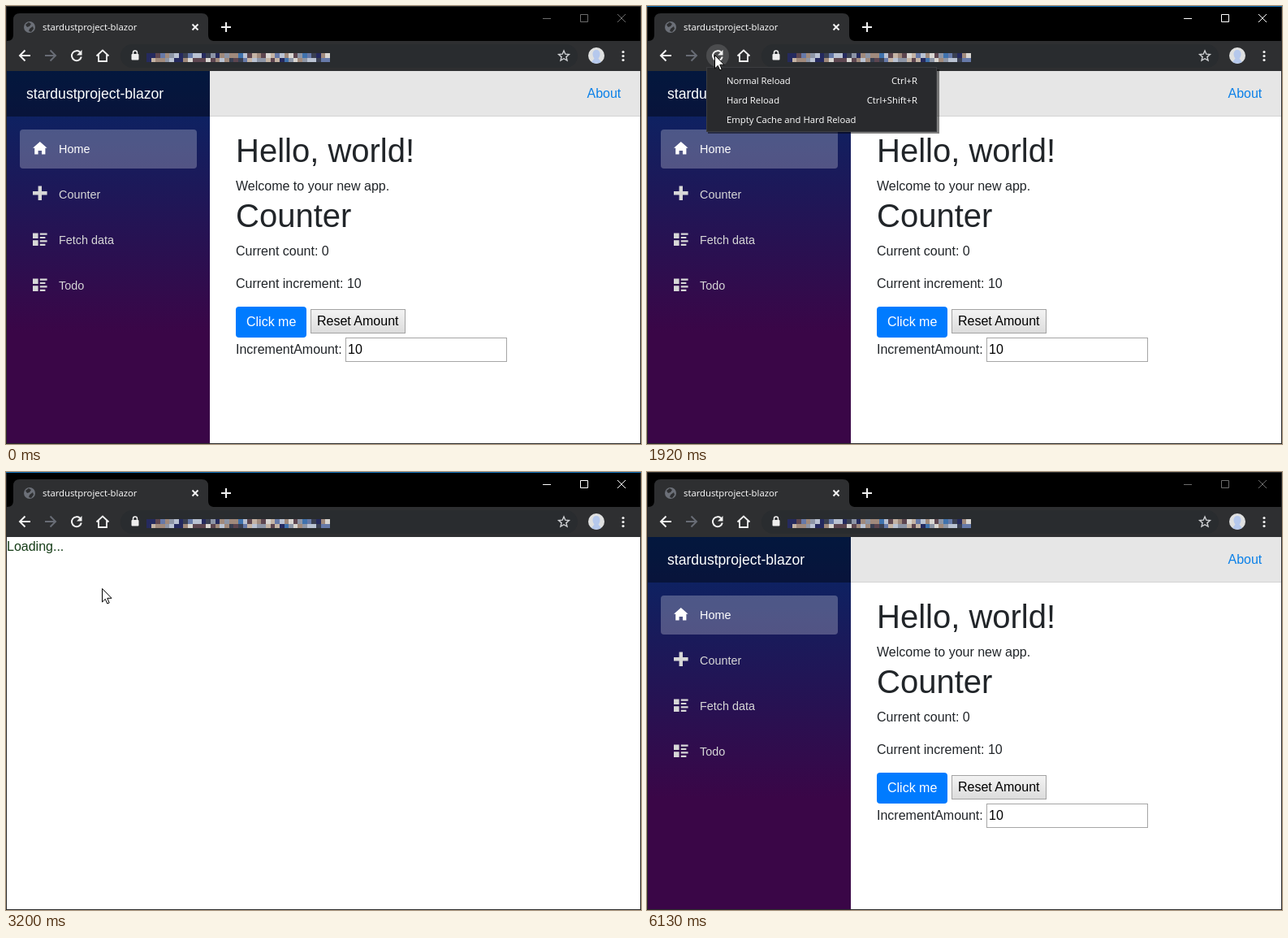
An HTML page for the animation above (6280 ms loop, 782 by 539 pixels).

```html
<!DOCTYPE html>
<html lang="en">
<head>
<meta charset="utf-8">
<title>Blazor app reload</title>
<style>
  html, body { margin: 0; width: 100%; height: 100%; overflow: hidden; background: #000; }
  svg { display: block; width: 782px; height: 539px; }
  text { white-space: pre; }
  .page { font: 16px "Liberation Sans", Arial, sans-serif; fill: #212529; }
  .h1 { font-size: 40px; }
  .brand { font-size: 17.6px; fill: #fff; }
  .nav { font-size: 14.4px; fill: #d7d7d7; }
  .ui { font: 11.3px "Open Sans", "Noto Sans", sans-serif; fill: #fff; }
  .end { text-anchor: end; }
  .line { fill: none; stroke: #f1f1f1; stroke-width: 2; }

  .timed { animation: 6.28s step-end infinite; }
  .focus { animation-name: focus; }
  .blur { animation-name: blur; }
  .hover { animation-name: hover; }
  .menu { animation-name: menu; }
  .row { animation-name: row; }
  .idle { animation-name: idle; }
  .busy { animation-name: busy; }
  .app { animation-name: app; }
  .icons { animation-name: icons; }
  .loading { animation-name: loading; }
  .press { animation-name: press; }
  .cursor { animation-name: cursor; }
  .spin { transform-origin: 29px 26px; animation: spin .7s linear infinite; }

  @keyframes focus { 0%, 97.61% { visibility: hidden } 18.31% { visibility: visible } }
  @keyframes blur { 0%, 97.61% { visibility: visible } 18.31% { visibility: hidden } }
  @keyframes hover { 0%, 50.95% { opacity: 0 } 14.64% { opacity: .4 } 15.85% { opacity: .75 } 17.06% { opacity: 1 } }
  @keyframes menu { 0%, 44.1% { visibility: hidden } 26.91% { visibility: visible } }
  @keyframes row {
    0%, 44.1% { opacity: 0; transform: none }
    32.96% { opacity: 1; transform: translateY(-48px) }
    34.16% { opacity: 1; transform: translateY(-24px) }
    35.35% { opacity: 1; transform: none }
  }
  @keyframes idle { 0%, 50.95% { visibility: visible } 45.54% { visibility: hidden } }
  @keyframes busy { 0%, 50.95% { visibility: hidden } 45.54% { visibility: visible } }
  @keyframes app { 0%, 70.38% { opacity: 1 } 46.81% { opacity: 0 } }
  @keyframes icons { 0%, 71.49% { opacity: 1 } 46.81% { opacity: 0 } }
  @keyframes loading { 0%, 70.38% { visibility: hidden } 48.24% { visibility: visible } }
  @keyframes press { 0%, 30.57%, 44.1% { opacity: 0 } 18.31%, 38.05% { opacity: .88 } }
  @keyframes spin { to { transform: rotate(360deg) } }
  @keyframes cursor {
    0%, 85.19% { transform: translate(800px, 560px) }
    3.66% { transform: translate(650px, 464px) }
    4.88% { transform: translate(521px, 268px) }
    6.09% { transform: translate(400px, 180px) }
    7.31% { transform: translate(300px, 136px) }
    8.52% { transform: translate(222px, 106px) }
    9.73% { transform: translate(162px, 84px) }
    10.95% { transform: translate(116px, 68px) }
    12.16% { transform: translate(91px, 58px) }
    13.37% { transform: translate(80px, 54px) }
    14.64%, 30.57% { transform: translate(83px, 60px) }
    31.77% { transform: translate(87px, 70px) }
    32.96% { transform: translate(95px, 92px) }
    34.16% { transform: translate(106px, 114px) }
    35.35% { transform: translate(114px, 127px) }
    39.33% { transform: translate(117px, 140px) }
    44.1% { transform: translate(118px, 143px) }
    79.29% { transform: translate(150px, 165px) }
    80.48% { transform: translate(260px, 235px) }
    81.66% { transform: translate(420px, 335px) }
    82.83% { transform: translate(580px, 430px) }
    84.01% { transform: translate(710px, 505px) }
  }
</style>
</head>
<body>
<svg viewBox="0 0 782 539">
  <defs>
    <linearGradient id="side" x2="0" y2="1">
      <stop stop-color="#052767"/><stop offset=".7" stop-color="#3a0647"/>
    </linearGradient>
    <linearGradient id="button" x2="0" y2="1">
      <stop stop-color="#f3f3f3"/><stop offset="1" stop-color="#dcdcdc"/>
    </linearGradient>
    <path id="list" d="M0 0v3h3v-3zm4 0v1h4v-1zm0 2v1h3v-1zm-4 2v3h3v-3zm4 0v1h4v-1zm0 2v1h3v-1z"/>
  </defs>

  <!-- window frame and tab -->
  <rect width="782" height="539"/>
  <path d="M1 43C7 43 9 40 9 35V17Q9 9 17 9H241Q249 9 249 17V35C249 40 251 43 257 43H781V80H1Z" fill="#2e2f31"/>
  <rect x="141" y="47" width="563" height="29" rx="14.5" fill="#292c2f"/>
  <g class="timed idle">
    <circle cx="29" cy="26" r="7" fill="#6c7078"/>
    <path d="M24 23l4-3 3 2-2 3-3 1zM29 28l4-3 1 3-3 4-3-1z" fill="#2e2f31"/>
  </g>
  <g class="timed busy">
    <circle cx="29" cy="27" r="4.5" fill="#6c7078"/>
    <path d="M26.5 25l2-1.500 2 1-1 2zM29 28l3-1-1 3z" fill="#2e2f31"/>
    <path class="spin" d="M29 18.500A7.500 7.500 0 0 1 33 19.700" fill="none" stroke="#777b82" stroke-width="1.500"/>
  </g>
  <text class="ui" x="45" y="30">stardustproject-blazor</text>
  <path class="line" stroke-width="1.700" d="M229.500 22.500l7 7m0-7l-7 7"/>
  <path class="line" d="M265 26h12M271 20v12"/>
  <g fill="none" stroke-width="1">
    <path class="timed blur" stroke="#6c6c6c" d="M661 15.500h10M707.500 10.500h9v9h-9zM753 10l10 10m0-10l-10 10"/>
    <path class="timed focus" stroke="#fff" d="M661 15.500h10M707.500 10.500h9v9h-9zM753 10l10 10m0-10l-10 10"/>
  </g>

  <!-- toolbar -->
  <path class="line" d="M30 61H17m6.500-6.500L17 61l6.500 6.500"/>
  <path class="line" style="stroke:#686c75" d="M48 61h13m-6.500-6.500L61 61l-6.500 6.500"/>
  <circle class="timed hover" cx="87" cy="61" r="14" fill="#4b4c4e"/>
  <g class="timed idle">
    <path class="line" d="M91.500 57.200A6 6 0 1 0 92.800 62.500"/>
    <path d="M93.500 54v6.500H87z" fill="#f1f1f1"/>
  </g>
  <path class="line timed busy" style="stroke-width:1.700" d="M81.500 55.500l11 11m0-11l-11 11"/>
  <path class="line" style="stroke-width:1.800" d="M111.500 61.500L119 54.500l7.500 7M114 60v8h10v-8"/>
  <rect x="154.500" y="59" width="9" height="7.500" rx="1" fill="#eee"/>
  <path class="line" style="stroke-width:1.500" d="M156.500 59.500v-2a2.500 2.500 0 0 1 5 0v2"/>
  <g id="address" shape-rendering="crispEdges"></g>
  <path class="line" style="stroke:#d0d2d5;stroke-width:1.400" d="M687 55l1.800 4.200 4.600.4-3.500 3 1.100 4.500-4-2.400-4 2.400 1.100-4.500-3.500-3 4.600-.4z"/>
  <circle cx="727" cy="61" r="10" fill="#dfe0e0"/>
  <path d="M727 54c3 0 4.500 2 4.500 5s-1 4-2 5.500l3.500 4.500q-6 3.500-12 0l3.500-4.500c-1-1.500-2-2.500-2-5.500s1.500-5 4.500-5z" fill="#b5c8ec"/>
  <g fill="#f1f1f1"><circle cx="760" cy="56.500" r="1.600"/><circle cx="760" cy="61.500" r="1.600"/><circle cx="760" cy="66.500" r="1.600"/></g>

  <!-- page -->
  <rect x="1" y="80" width="780" height="458" fill="#fff"/>
  <text class="page timed loading" x="1" y="97" style="fill:#163d18">Loading...</text>
  <g class="page timed app">
    <rect x="1" y="80" width="250" height="459" fill="url(#side)"/>
    <rect x="1" y="80" width="250" height="56" fill-opacity=".4" fill="#000"/>
    <text class="brand" x="25" y="114">stardustproject-blazor</text>
    <rect x="17" y="152" width="218" height="48" rx="4" fill="#fff" fill-opacity=".25"/>
    <text class="nav" x="65" y="181" style="fill:#fff">Home</text>
    <text class="nav" x="65" y="237">Counter</text>
    <text class="nav" x="65" y="293">Fetch data</text>
    <text class="nav" x="65" y="349">Todo</text>
    <g class="timed icons" fill="#d7d7d7">
      <path transform="translate(33 167) scale(2.200)" fill="#fff" d="M4 0l-4 3.500h1v3.500h2v-2h2v2h2v-3.500h1z"/>
      <path transform="translate(33 221.500) scale(2.200)" d="M3 0v3h-3v2h3v3h2v-3h3v-2h-3v-3z"/>
      <use href="#list" transform="translate(33 279.500) scale(2.200)"/>
      <use href="#list" transform="translate(33 335.500) scale(2.200)"/>
      <rect x="30" y="538" width="17" height="1"/>
    </g>
    <rect x="251" y="80" width="530" height="56" fill="#e6e6e6"/>
    <rect x="251" y="135" width="530" height="1" fill="#d3d3d3"/>
    <text x="715.500" y="113" fill="#0a80e8">About</text>
    <text class="h1" x="283" y="192">Hello, world!</text>
    <text x="283" y="227">Welcome to your new app.</text>
    <text class="h1" x="283" y="272">Counter</text>
    <text x="283" y="307">Current count: 0</text>
    <text x="283" y="347">Current increment: 10</text>
    <rect x="283" y="370" width="87" height="38" rx="4" fill="#007bff"/>
    <text x="296" y="394" fill="#fff">Click me</text>
    <rect x="375.500" y="373.500" width="116" height="29" fill="url(#button)" stroke="#a3a3a3"/>
    <text x="383" y="393" fill="#000">Reset Amount</text>
    <text x="283" y="428">IncrementAmount:</text>
    <rect x="418.500" y="408.500" width="198" height="29" fill="#fff" stroke="#a6a6a6"/>
    <text x="421" y="428" fill="#000">10</text>
  </g>

  <!-- window border -->
  <path d="M.5 0V538.500H781.500V0" fill="none" stroke="#2b2b2b"/>
  <rect class="timed blur" width="782" height="1" fill="#303030"/>
  <rect class="timed focus" width="782" height="1" fill="#1272bd"/>

  <!-- reload menu -->
  <g class="ui timed menu">
    <rect x="75" y="78" width="285" height="79" fill="#000" opacity=".5"/>
    <rect x="73.500" y="75.500" width="283" height="79" fill="#292a2d" stroke="#3c3d40"/>
    <rect class="timed row" x="74" y="127" width="282" height="24" fill="#4b4c4f"/>
    <text x="98" y="96">Normal Reload</text><text class="end" x="333" y="96">Ctrl+R</text>
    <text x="98" y="120">Hard Reload</text><text class="end" x="333" y="120">Ctrl+Shift+R</text>
    <text x="98" y="144">Empty Cache and Hard Reload</text>
  </g>

  <g class="timed cursor">
    <circle class="timed press" r="12" fill="#cdbb17"/>
    <path d="M.5.5V17L4.300 13.400 6.800 19 9.200 18 6.800 12.300H12Z" fill="#fff" stroke="#000"/>
  </g>
</svg>
<script>
  // Pixelated address: two rows of seeded random cells.
  const colors = ['#252a5e', '#b9c2d2', '#d9d6d2', '#a08a7c', '#6679a8', '#3a4052', '#8d95a6', '#3f72ad', '#c4b3a4', '#5d4650'];
  const address = document.getElementById('address');
  const cell = 5.65;
  let seed = 29;
  const random = () => (seed = (seed * 16807) % 2147483647) / 2147483647;

  for (let col = 0; col < 40; col++) {
    for (let row = 0; row < 2; row++) {
      const rect = document.createElementNS(address.namespaceURI, 'rect');
      const fill = col ? colors[Math.floor(random() * colors.length)] : colors[0];
      const attrs = { x: 173 + col * cell, y: 58 + row * cell, width: cell, height: cell, fill };
      for (const name in attrs) rect.setAttribute(name, attrs[name]);
      address.append(rect);
    }
  }
</script>
</body>
</html>
```
